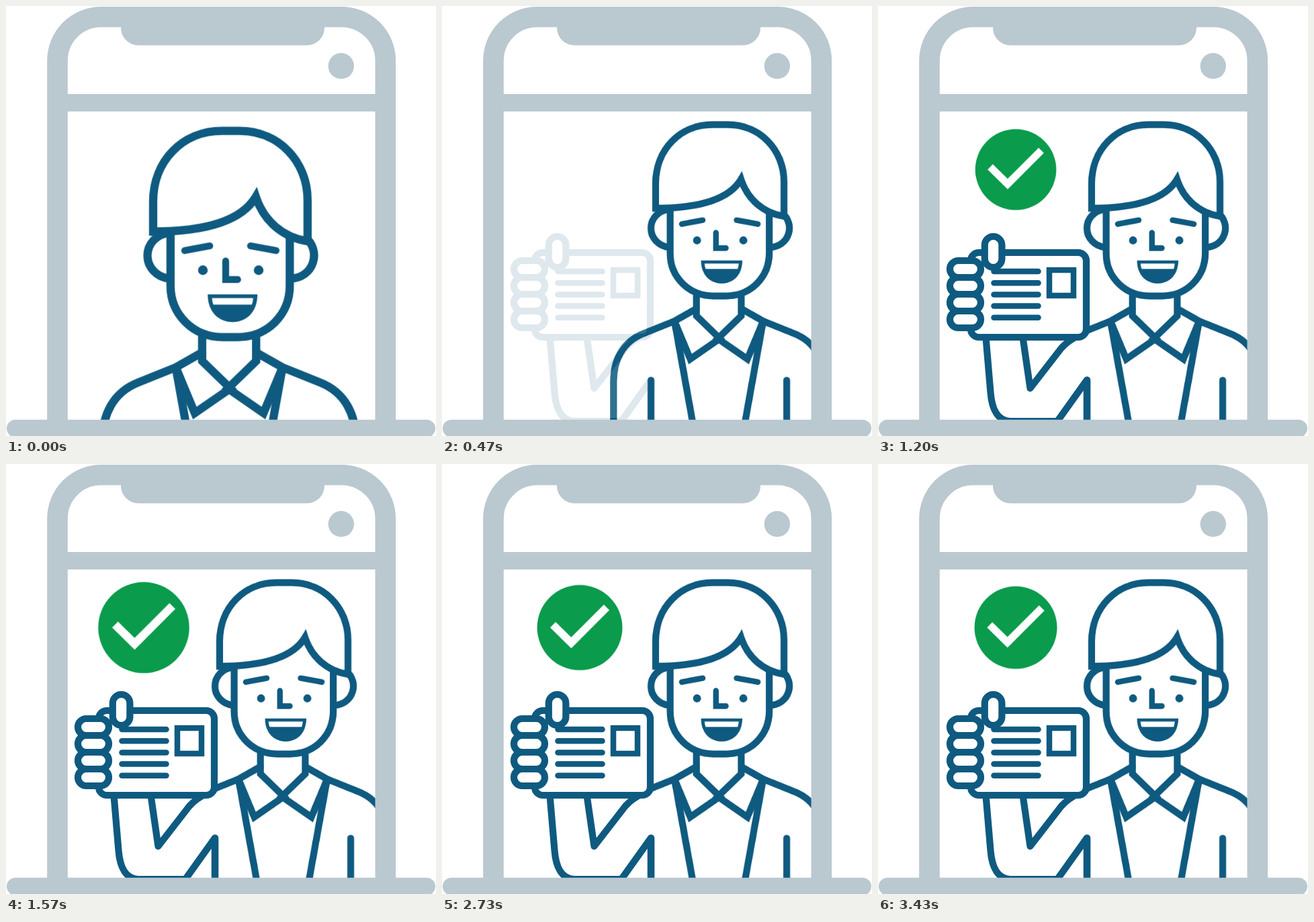
These frames come from a looping animation (640 px wide and 640 px high, 4.33 s). An HTML page:

```html
<!DOCTYPE html>
<html lang="en">
<head>
<meta charset="utf-8">
<title>Identity check</title>
<style>
  html, body { margin: 0; width: 100%; height: 100%; overflow: hidden; background: #fff; }
  svg { display: block; width: 100%; height: 100%; }

  .ink { fill: none; stroke: #0f5a80; stroke-width: 10.2; }
  .round { stroke-linecap: round; stroke-linejoin: round; }
  .thin { stroke-width: 8.5; stroke-linecap: round; }
  .paper { fill: #fff; }
  .solid { fill: #0f5a80; stroke: none; }
  .blank { fill: #fff; stroke: none; }

  .man, .arm, .tick { animation: 4330ms linear infinite; }
  .man { animation-name: step-aside; }
  .arm { animation-name: fade-in; }
  .tick { animation-name: pulse; }

  @keyframes step-aside {
    0% { transform: translate(-163.7px, -26.5px) scale(1.2034); animation-timing-function: cubic-bezier(.37, 0, .63, 1); }
    9.24%, 100% { transform: translate(0, 0) scale(1); }
  }
  @keyframes fade-in {
    0%, 9.7% { opacity: 0; }
    18.4%, 100% { opacity: 1; }
  }
  @keyframes pulse {
    0% { transform: scale(0); }
    18.36% { transform: scale(0); animation-timing-function: cubic-bezier(.3, .2, .6, 1); }
    32.16%, 50.98%, 69.8% { transform: scale(1.067); animation-timing-function: cubic-bezier(.37, 0, .63, 1); }
    41.57%, 60.39% { transform: scale(.911); animation-timing-function: cubic-bezier(.37, 0, .63, 1); }
    79.21%, 100% { transform: scale(.911); }
  }
</style>
</head>
<body>
<svg viewBox="0 0 640 640">
  <defs>
    <clipPath id="screen"><rect x="80" y="150" width="480" height="466"/></clipPath>
    <rect id="finger" x="107" y="379" width="46" height="25" rx="12.5"/>
    <path id="line" d="M172.500 395H238.500"/>
    <!-- one half of collar and jacket, mirrored for the other -->
    <g id="half">
      <path d="M378.600 430V461L413.500 495L369.500 525.500L346 469"/>
      <path class="round" d="M378.600 450.500L346 469L300 487.500C268 500 255.300 528 255.300 559V625M346 469L373.500 622"/>
      <path class="round" d="M311 557V625"/>
    </g>
  </defs>

  <g clip-path="url(#screen)">
    <g class="man ink">
      <!-- head -->
      <path d="M318 301V264C318 214 354 176.500 403 176.500H425C473 176.500 509 214 509 262V313C478 308 455 288 445 258C420 300 345 301 318 301Z"/>
      <path d="M339.500 301V368C339.500 404 368 431.500 404 431.500H423C459 431.500 487 404 487 368V308"/>
      <path d="M337 302.500A30 28.500 0 0 0 337 359M506 308A28.500 28.500 0 0 1 489 359"/>
      <!-- face -->
      <path class="thin" d="M357 324.500L388 318.700M438.500 318.700L470 324.500M407.700 337.500V360.300H422.500"/>
      <circle class="solid" cx="379.500" cy="348.800" r="6"/>
      <circle class="solid" cx="448.500" cy="348.800" r="6"/>
      <path class="solid" d="M385.500 378.800H447C447 400 434 413 416.200 413C398.500 413 385.500 400 385.500 378.800Z"/>
      <path class="blank" d="M390.800 383.300H441.700Q441.500 388 440 391.300H392.500Q391 388 390.800 383.300Z"/>
      <!-- body -->
      <use href="#half"/>
      <use href="#half" transform="translate(824 0) scale(-1 1)"/>
    </g>

    <g class="arm ink">
      <path class="blank" d="M161 490L168 575C170 600 179 617 197 617H266L311 556V487Z"/>
      <path class="round" d="M160.500 493L167.500 575C169.500 601 179 618 197 618H267L311 556.500V625"/>
      <path class="round" d="M215.500 493L226.500 569L273 509Q283 498 298 491"/>
      <rect class="paper" x="138" y="367" width="172" height="126" rx="12"/>
      <g class="thin">
        <use href="#line"/>
        <use href="#line" y="17.200"/>
        <use href="#line" y="34.400"/>
        <use href="#line" y="51.600"/>
        <use href="#line" y="68.800"/>
        <rect x="255" y="393" width="36" height="38"/>
      </g>
      <g class="paper">
        <use href="#finger"/>
        <use href="#finger" y="25"/>
        <use href="#finger" y="50"/>
        <use href="#finger" y="75"/>
        <rect x="158.800" y="343" width="25.600" height="46" rx="12.800"/>
      </g>
    </g>

    <g transform="translate(205 243.500)">
      <g class="tick">
        <circle r="67.500" fill="#0a9b4c"/>
        <path d="M-42.500 -4.500L-13.500 24L42.500 -32" fill="none" stroke="#fff" stroke-width="12.300"/>
      </g>
    </g>
  </g>

  <!-- phone -->
  <g fill="#bac8d0">
    <path d="M76.500 625V81.300A65 65 0 0 1 141.500 16.300H499.800A65 65 0 0 1 564.800 81.300V625" fill="none" stroke="#bac8d0" stroke-width="30.600"/>
    <path d="M171 28H474V33A26 26 0 0 1 448 58.500H197A26 26 0 0 1 171 33Z"/>
    <rect x="80" y="131" width="480" height="26"/>
    <circle cx="498.800" cy="89.300" r="19.200"/>
    <rect x="1" y="615.700" width="638" height="26" rx="13"/>
  </g>
</svg>
</body>
</html>
```
